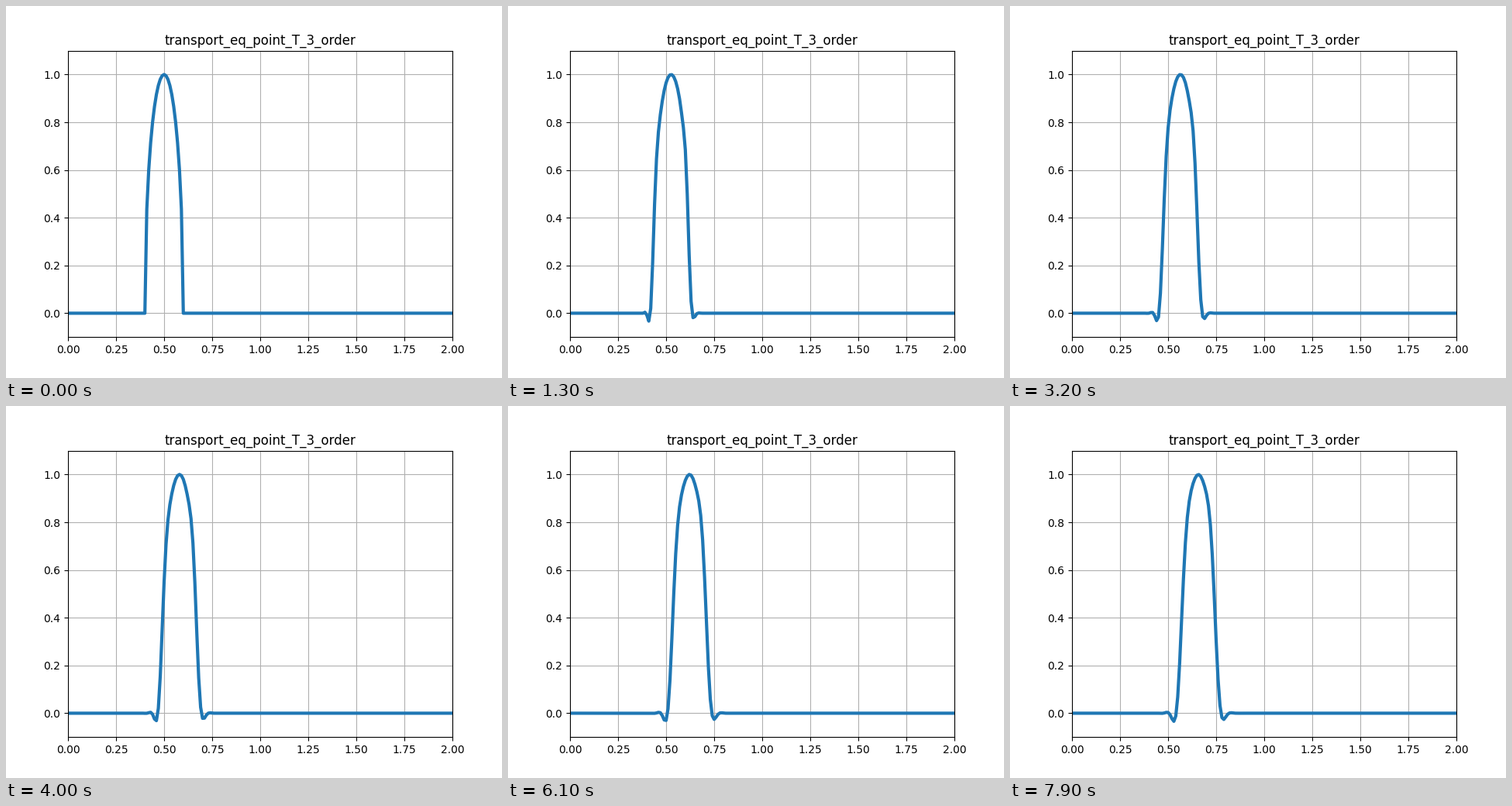
These frames come from a looping animation (640 px wide and 480 px high, 8000 ms). A matplotlib script:

```python
import matplotlib.pyplot as plt
import numpy as np
from matplotlib.animation import FuncAnimation

FRAMES, INTERVAL = 80, 100
CFL = 0.2        # cells travelled per frame
DAMPING = 0.004  # extra fourth-difference smoothing


def third_order_weights(c, damping):
    """Weights of u[j-2] .. u[j+2] for one step of u_t + u_x = 0."""
    cubic = np.array([
        -c * (1 - c**2) / 6,
        c * (1 + c) * (2 - c) / 2,
        (1 - c**2) * (2 - c) / 2,
        -c * (1 - c) * (2 - c) / 6,
        0,
    ])
    return cubic - damping * np.array([1, -4, 6, -4, 1])


def solve(u, weights, count):
    states = [u]
    for _ in range(count - 1):
        padded = np.pad(states[-1], 2)
        states.append(sum(w * padded[k:k + u.size] for k, w in enumerate(weights)))
    return states


x = np.linspace(0, 2, 201)
cells = np.arange(201) - 50
start = np.sqrt(np.clip(1 - (cells / 10)**2, 0, None))
states = solve(start, third_order_weights(CFL, DAMPING), FRAMES)

fig, ax = plt.subplots(figsize=(6.4, 4.8), dpi=100)
ax.set(xlim=(0, 2), ylim=(-0.1, 1.1), title="transport_eq_point_T_3_order")
ax.grid()
line, = ax.plot(x, start, lw=3)


def update(i):
    line.set_ydata(states[i])
    return line,


anim = FuncAnimation(fig, update, frames=FRAMES, interval=INTERVAL,
                     repeat=True, repeat_delay=0)
plt.show()
```
